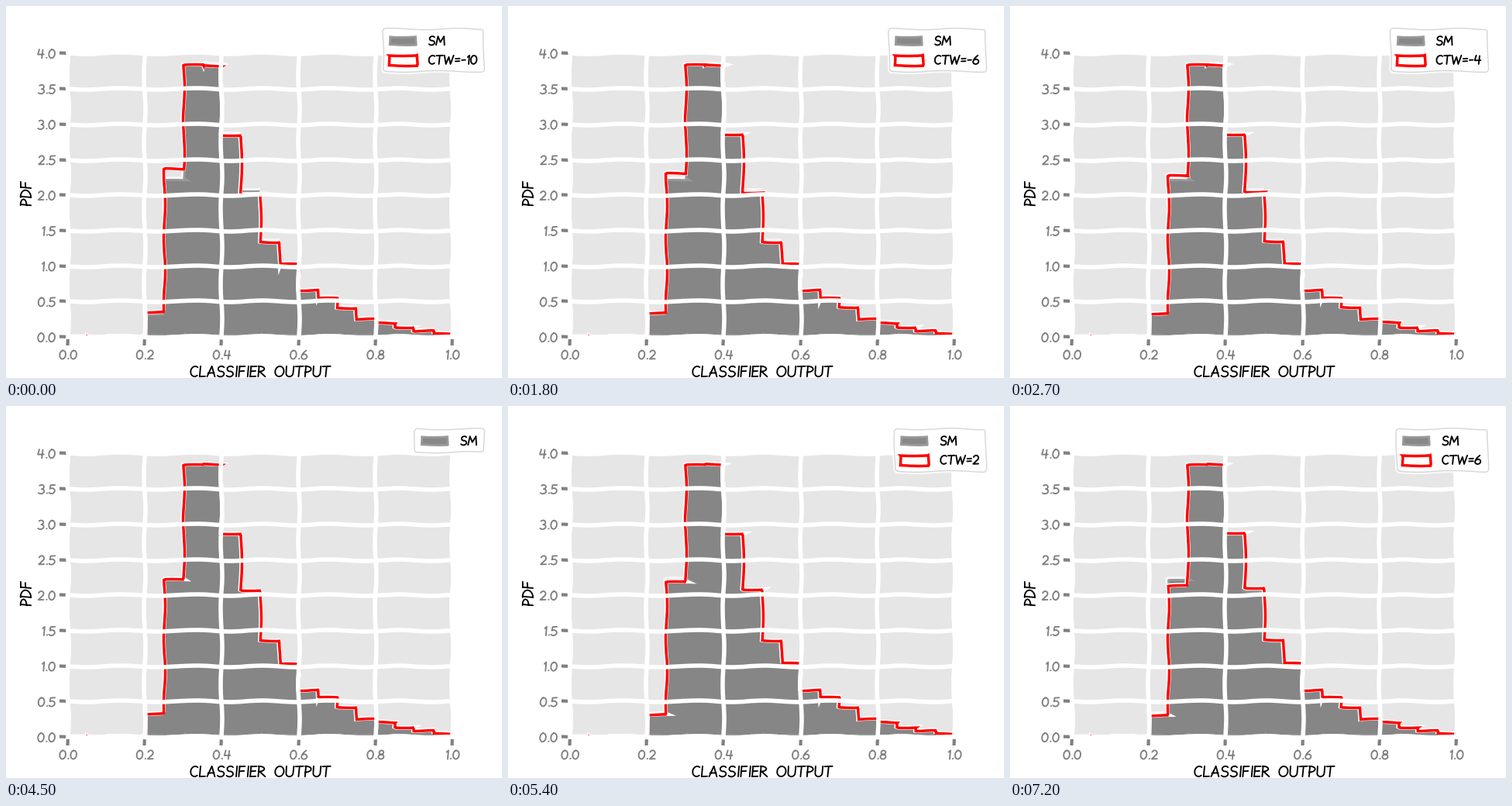
These frames come from a looping animation (640 px wide and 480 px high, 8 s). A matplotlib script:

```python
import numpy as np
import matplotlib.pyplot as plt
from matplotlib import patheffects
from matplotlib.animation import FuncAnimation
from matplotlib.patches import FancyBboxPatch, PathPatch, Rectangle
from matplotlib.path import Path
from matplotlib.transforms import IdentityTransform

W, H, DPI = 640, 480, 100
PIXELS = IdentityTransform()

plt.rcParams.update({
    "path.sketch": (1, 100, 2),
    "path.effects": [patheffects.withStroke(linewidth=4, foreground="w")],
    "axes.facecolor": "#E6E6E6",
    "axes.edgecolor": "w",
    "axes.linewidth": 1.5,
    "axes.grid": True,
    "axes.axisbelow": "line",
    "grid.color": "w",
    "grid.linestyle": "-",
})
for axis in ("xtick", "ytick"):
    plt.rcParams.update({f"{axis}.color": "gray",
                         f"{axis}.major.size": 8,
                         f"{axis}.major.width": 3})

BINS = np.linspace(0, 1, 21)
CENTERS = (BINS[:-1] + BINS[1:]) / 2
BASE = np.concatenate([np.zeros(4), [
    0.325, 2.22, 3.84, 3.848, 2.875, 2.083, 1.365, 1.035,
    0.668, 0.555, 0.425, 0.258, 0.205, 0.14, 0.092, 0.045]])
# Relative growth of the bars per unit of coupling
TILT = np.interp(CENTERS, [0.275, 0.325, 0.425, 0.475, 0.575],
                 [-0.0068, 0, 0.0007, 0.0026, 0.0005])


def bar_heights(coupling):
    return BASE * (1 + TILT * coupling)


# Hand lettering: strokes in units of the cap height
def line(*xy):
    return np.reshape(xy, (-1, 2)).astype(float)


def arc(cx, cy, rx, ry, start, end):
    t = np.radians(np.linspace(start, end, 20))
    return np.column_stack([cx + rx * np.cos(t), cy + ry * np.sin(t)])


def join(*parts):
    return np.vstack(parts)


def bar(y, right=0.6):
    return line(.08, y - .01, right, y + .01)


def bowl(low, high, right=0.6):
    return arc(.05, (low + high) / 2, right - .05, (high - low) / 2, 95, -90)


def ring(rx, start=100, end=460):
    return arc(rx + .03, .5, rx, .49, start, end)


STEM = line(.08, 1, .07, 0)

GLYPHS = {
    "A": [line(.02, 0, .4, 1, .76, 0), bar(.35, .66)],
    "C": [ring(.41, 55, 308)],
    "D": [STEM, bowl(0, 1, .72)],
    "E": [STEM, bar(.98), bar(.53, .54), bar(.02)],
    "F": [STEM, bar(.98), bar(.53, .54)],
    "I": [STEM + [.08, 0]],
    "L": [STEM, bar(.02)],
    "M": [line(.03, 0, .17, 1, .5, .32, .86, 1, .99, 0)],
    "O": [ring(.42)],
    "P": [STEM, bowl(.42, 1)],
    "R": [STEM, bowl(.48, 1), line(.18, .48, .74, 0)],
    "S": [join(arc(.40, .75, .30, .25, 35, 260),
               arc(.36, .25, .34, .26, 80, -145))],
    "T": [line(0, .97, .75, 1), line(.39, .98, .36, 0)],
    "U": [join(line(.05, 1), arc(.4, .35, .34, .35, 180, 360), line(.75, 1))],
    "W": [line(0, 1, .25, 0, .52, .82, .78, 0, 1.06, 1)],
    "=": [bar(.63, .56), bar(.33, .56)],
    "-": [bar(.47, .48)],
    ".": [line(.16, .04, .20, .06)],
    "0": [ring(.34)],
    "1": [line(.08, .80, .27, 1, .26, 0)],
    "2": [join(arc(.34, .70, .29, .30, 160, -35), bar(.03, .68))],
    "3": [join(arc(.30, .76, .29, .24, 140, -80),
               arc(.30, .26, .36, .27, 80, -140))],
    "4": [line(.16, 1, .04, .42, .72, .44), line(.56, .95, .52, 0)],
    "5": [join(line(.64, 1, .14, .97, .10, .56),
               arc(.30, .31, .36, .31, 115, -140))],
    "6": [join(line(.54, 1, .22, .68),
               arc(.37, .28, .32, .28, 150, -190))],
    "8": [arc(.36, .76, .25, .23, -90, 270), arc(.36, .27, .31, .26, 90, 450)],
}
GAP, SPACE, SLANT = 0.17, 0.72, 0.08


def lay_out(text):
    """Return the strokes of a text and the width of its ink."""
    strokes, x = [], 0
    for char in text:
        if char == " ":
            x += SPACE
            continue
        strokes += [part + [x, 0] for part in GLYPHS[char]]
        x = max(s[:, 0].max() for s in strokes) + GAP
    return strokes, x - GAP


def letter(text, x, y, cap, color="k", align=0.0, upright=False):
    """Draw text centred vertically on y; align runs from left 0 to right 1."""
    strokes, width = lay_out(text)
    paths = []
    for stroke in strokes:
        pts = (stroke - [align * width, 0.5]) * cap
        pts[:, 0] += SLANT * pts[:, 1]
        if upright:
            pts = np.column_stack([-pts[:, 1], pts[:, 0]])
        paths.append(Path(pts + [x, H - y]))
    patch = PathPatch(Path.make_compound_path(*paths), fill=False, ec=color,
                      lw=1.35, capstyle="round", joinstyle="round",
                      transform=PIXELS, zorder=6)
    patch.set_sketch_params(None)
    patch.set_path_effects([])
    return fig.add_artist(patch)


fig = plt.figure(figsize=(W / DPI, H / DPI), dpi=DPI, facecolor="w")
ax = fig.add_axes([0.125, 0.11, 0.775, 0.77])
ax.set_xlim(0, 1)
ax.set_ylim(0, 1.05 * BASE.max() + 0.001)
ax.set_xticks(np.arange(6) * 0.2)
ax.set_yticks(np.arange(9) * 0.5)
ax.tick_params(labelbottom=False, labelleft=False)

TICK_CAP, LABEL_CAP, LEGEND_CAP = 11.3, 13.4, 11.2
for value in ax.get_xticks():
    letter(f"{value:.1f}", 80 + 496 * value, 450, TICK_CAP, "gray", 0.5)
for value in ax.get_yticks():
    letter(f"{value:.1f}", 63, 427.7 - 91.5 * value, TICK_CAP, "gray", 1)
letter("CLASSIFIER OUTPUT", 328, 471.5, LABEL_CAP, align=0.5)
letter("PDF", 25.5, 242.5, LABEL_CAP, align=0.5, upright=True)

OUTLINE = dict(fill=False, ec="red", lw=2.5)
SOLID = dict(fc="gray", alpha=0.75, lw=0)
ax.hist(CENTERS, BINS, weights=BASE, histtype="stepfilled",
        color="gray", alpha=0.75)

# Legend measures in pixels
EM = 13 * DPI / 72
RIGHT, TOP, ROW, BEARING = 616.6, 29.7, 15.6, 3


def draw_legend(labels):
    pad, gap = 0.4 * EM, 0.5 * EM
    text = max(lay_out(s)[1] for s in labels) * LEGEND_CAP + BEARING
    width = 2.8 * EM + text + 2 * pad
    height = 2 * pad + len(labels) * ROW + (len(labels) - 1) * gap
    left = RIGHT - width
    artists = [fig.add_artist(FancyBboxPatch(
        (left, H - TOP - height), width, height,
        boxstyle="round,pad=0,rounding_size=0.2", mutation_scale=EM,
        fc="w", ec="0.8", alpha=0.8, lw=1, transform=PIXELS, zorder=4))]
    for i, (label, style) in enumerate(zip(labels, (SOLID, OUTLINE))):
        y = TOP + pad + ROW / 2 + i * (ROW + gap)
        artists.append(fig.add_artist(Rectangle(
            (left + pad, H - y - 0.35 * EM), 2 * EM, 0.7 * EM,
            transform=PIXELS, zorder=5, **style)))
        artists.append(letter(label, left + pad + 2.8 * EM + 1, y, LEGEND_CAP))
    return artists


STEP_FRAMES, LAST_STEP = 9, 8
shown = []


def update(frame):
    while shown:
        shown.pop().remove()
    coupling = -10 + 2 * min(frame // STEP_FRAMES, LAST_STEP)
    # Below the grid, like the filled bars
    _, _, steps = ax.hist(CENTERS, BINS, weights=bar_heights(coupling),
                          histtype="step", color="red", lw=2.5, zorder=1)
    shown.extend(steps)
    labels = ["SM"] + ([f"CTW={coupling}"] if coupling else [])
    shown.extend(draw_legend(labels))
    return shown


anim = FuncAnimation(fig, update, frames=80, interval=100, repeat=True,
                     repeat_delay=0, blit=False)
plt.show()
```
